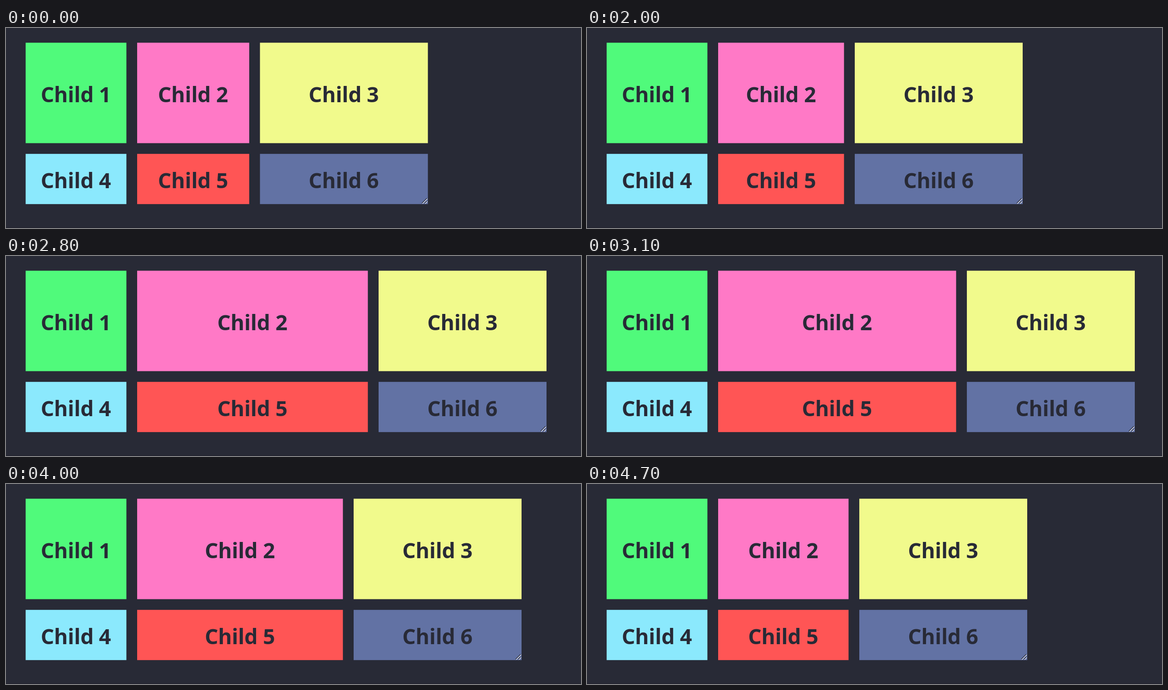
An HTML page that plays this animation: 1267 by 442 pixels, repeating every 6.2 s.

```html
<!DOCTYPE html>
<html lang="en">
<head>
<meta charset="utf-8">
<title>Resizable grid</title>
<style>
  html, body { margin: 0; width: 100%; height: 100%; overflow: hidden; background: #282a36; }
  svg { display: block; width: 1267px; height: 442px; }
  text {
    font: 700 46.5px "Open Sans", "Noto Sans", sans-serif;
    letter-spacing: -0.3px;
    text-anchor: middle;
    fill: #282a36;
  }
</style>
</head>
<body>
<svg id="stage" viewBox="0 0 1267 442">
  <rect width="1267" height="442" fill="#282a36"/>
  <rect y="440.5" width="1267" height="1.5" fill="#22232e"/>
</svg>
<script>
const LOOP = 6200, TICK = 100;
// Grid of 150px and 250px columns, 150px and 75px rows, 16px gaps, zoomed
const ZOOM = 1.48;
const LEFT = 43.3, TOP = 32.5, GAP = 16 * ZOOM, COL1 = 150 * ZOOM, COL3 = 250 * ZOOM;
const ROWS = [
  { y: TOP, h: 150 * ZOOM },
  { y: TOP + 150 * ZOOM + GAP, h: 75 * ZOOM }
];
const BOTTOM = ROWS[1].y + ROWS[1].h;
const BASELINE = 20;   // below the middle of a cell
const COLORS = ['#50fa7b', '#ff79c6', '#f1fa8c', '#8be9fd', '#ff5555', '#6272a4'];

// [time, right edge of the grid] while the handle is dragged
const REST = 929.6;
const DRAG = [
  [1400, 925.5], [1500, 925.5], [1700, 911], [1800, 911], [1900, 931], [2000, 960],
  [2500, 1114], [2800, 1191], [3200, 1212], [3500, 1232.3], [3600, 1232.3],
  [4000, 1136], [4300, 1041], [4700, 970]
];

const stage = document.getElementById('stage');

function add(parent, tag, attrs) {
  const el = document.createElementNS('http://www.w3.org/2000/svg', tag);
  for (const k in attrs) el.setAttribute(k, attrs[k]);
  return parent.appendChild(el);
}

const cells = COLORS.map((fill, i) => {
  const { y, h } = ROWS[Math.floor(i / 3)];
  const box = add(stage, 'rect', { y, height: h, fill });
  const label = add(stage, 'text', { y: y + h / 2 + BASELINE });
  label.textContent = 'Child ' + (i + 1);
  return { box, label };
});

// Resize handle, drawn relative to the bottom right corner
const handle = add(stage, 'g', { fill: 'none', 'stroke-width': 1.5 });
add(handle, 'path', { d: 'M-13 -2L-2 -13M-7 -2L-2 -7', stroke: '#20222e' });
add(handle, 'path', { d: 'M-12 -1L-1 -12M-6 -1L-1 -6', stroke: '#dfe2ec' });

const slope = i => (DRAG[i + 1][1] - DRAG[i][1]) / (DRAG[i + 1][0] - DRAG[i][0]);

// Tangent that never overshoots the neighbouring points
function tangent(i) {
  if (i === 0 || i === DRAG.length - 1) return 0;
  const a = slope(i - 1), b = slope(i);
  return a * b > 0 ? 2 * a * b / (a + b) : 0;
}

function rightEdge(t) {
  if (t < DRAG[0][0]) return REST;
  const i = DRAG.findIndex(k => k[0] > t) - 1;
  if (i < 0) return DRAG[DRAG.length - 1][1];
  const [t0, p0] = DRAG[i], [t1, p1] = DRAG[i + 1];
  const d = t1 - t0, u = (t - t0) / d, v = 1 - u;
  return p0 * v * v * (1 + 2 * u) + p1 * u * u * (3 - 2 * u)
    + d * u * v * (tangent(i) * v - tangent(i + 1) * u);
}

function draw(time) {
  const t = Math.floor((time % LOOP) / TICK) * TICK;
  const right = rightEdge(t);
  const x2 = LEFT + COL1 + GAP, x3 = right - COL3;
  const cols = [[LEFT, COL1], [x2, x3 - GAP - x2], [x3, COL3]];
  cells.forEach(({ box, label }, i) => {
    const [x, w] = cols[i % 3];
    box.setAttribute('x', x);
    box.setAttribute('width', w);
    label.setAttribute('x', x + w / 2 - 0.5);
  });
  handle.setAttribute('transform', `translate(${right} ${BOTTOM})`);
}

const start = performance.now();
function frame() {
  draw(performance.now() - start);
  requestAnimationFrame(frame);
}
frame();
</script>
</body>
</html>
```
